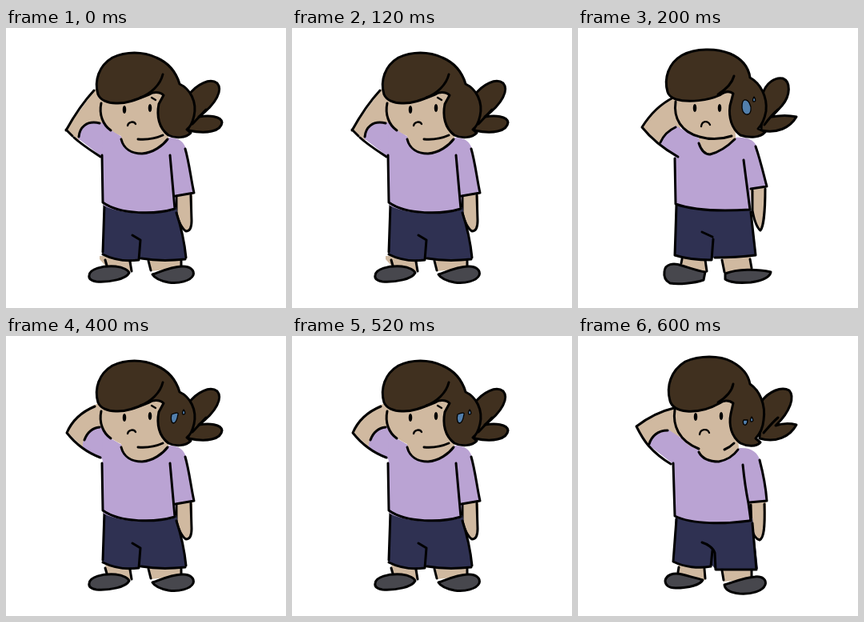
An HTML page that plays this animation: 350 px wide and 350 px high, repeating every 0.8 s.

```html
<!DOCTYPE html>
<html lang="en">
<head>
<meta charset="utf-8">
<title>Puzzled girl</title>
<style>
  html, body { margin: 0; width: 100%; height: 100%; overflow: hidden; background: #fff; }
  svg { display: block; width: 100vw; height: 100vh; }
  path { fill: none; stroke: none; stroke-width: 3; stroke-linecap: round; stroke-linejoin: round; }
  .skin { fill: #d0b9a0; }
  .shirt { fill: #baa3d3; }
  .shorts { fill: #2f3152; }
  .shoe { fill: #47474d; stroke: #000; }
  .hair { fill: #40301f; stroke: #000; }
  .line { stroke: #000; }
  .thin { stroke: #000; stroke-width: 2.3; }
  .eye { fill: #000; }
  .drop { fill: #527fac; stroke: #000; stroke-width: 1.3; }
  .pose { visibility: hidden; animation: show .8s step-end infinite; }
  .p2 { animation-delay: -.6s; }
  .p3 { animation-delay: -.4s; }
  .p4 { animation-delay: -.2s; }
  .twice { animation: blink .4s step-end infinite; }
  @keyframes show { 0% { visibility: visible; } 25%, 100% { visibility: hidden; } }
  @keyframes blink { 0% { visibility: visible; } 50%, 100% { visibility: hidden; } }
</style>
</head>
<body>
<svg viewBox="0 0 350 350">

  <!-- raised arm, high elbow -->
  <g class="pose p1">
    <path class="skin" d="M112 76L75 127L90 140L125 135L125 88ZM117 285L117 289L126 299L130 285Z"/>
    <path class="shirt" d="M90 138C92 125 100 116 119 118L146 137L146 172L120 161Z"/>
    <path class="line" d="M110 78C97 92 85 110 75 128M75 127L83 135M91 136C92 125 100 115 117 119M85 137C95 146 106 153 118 161"/>
  </g>

  <!-- raised arm, bent lower -->
  <g class="pose p3">
    <path class="skin" d="M116 84C95 92 82 106 76 120L96 139L126 135L125 88Z"/>
    <path class="shirt" d="M96 134C99 122 106 115 118 113L124 124L146 137L146 172L120 154L96 140Z"/>
    <path class="line" d="M111 88C94 95 82 107 76 121C87 135 102 146 118 152M98 130C101 122 107 115 117 114"/>
  </g>

  <!-- leaning pose -->
  <g class="pose twice">
    <path class="skin" d="M124 285L126 300L157 304L157 285ZM178 285L181 304L219 300L219 285ZM211 207L213 232C217 244 222 251 226 254C231 253 234 244 233 205Z"/>
    <path class="line" d="M124 290L126 297M155 292L157 304M178 291L181 303M219 291L219 297M213 211L213 232C215 241 220 251 225 254C230 254 232 249 232 241L231 209"/>
    <path class="shoe" d="M104 309C105 301 120 297 137 298C147 299 153 303 154 306C150 314 130 318 113 317C106 316 103 313 104 309Z"/>
    <path class="shoe" d="M183 308C193 305 204 299 219 298C230 297 236 303 234 309C231 316 216 320 203 318C193 316 186 313 183 308Z"/>
    <path class="shorts" d="M122 218L121 283C135 290 151 292 167 290L168 287C185 291 208 291 226 288L213 224Z"/>
    <path class="line" d="M123 221L121 280M121 283C135 290 151 292 166 290L168 265L158 259M169 288C186 291 206 291 224 289M213 231C218 246 223 267 225 287"/>
    <path class="shirt" d="M120 122L144 136L204 137C216 137 222 142 225 151C229 170 232 189 235 206L212 210L212 227C192 233 148 235 122 222Z"/>
    <path class="line" d="M120 159L121 218C143 234 188 233 211 226L205 159M224 151C229 168 231 188 235 206L212 210"/>
    <path class="skin" d="M119 88C116 111 122 125 144 135C146 150 156 157 170 157C185 156 197 147 203 138L198 75L130 75Z"/>
    <path class="line" d="M119 94C116 108 121 121 131 128M144 139C147 151 157 157 170 157C184 156 196 147 202 139M165 139C176 140 187 138 196 134"/>
    <path class="hair" d="M228 84C239 70 255 62 264 69C271 77 264 94 241 111C254 109 269 110 270 118C269 129 251 133 228 128Z"/>
    <path class="line" d="M233 120C238 115 245 107 250 102"/>
    <path class="hair" d="M115 83C110 66 116 47 133 37C150 29 171 29 188 37C202 43 212 53 217 70C230 76 239 92 235 110C233 119 230 124 226 127C228 129 230 130 231 131C225 138 211 138 203 134C191 125 188 110 191 95L197 84C192 79 183 80 179 83C162 90 149 95 137 94C127 94 118 90 115 83Z"/>
    <path class="line" d="M196 58C193 71 181 82 168 87"/>
    <path class="thin" d="M182 87L187 90"/>
    <path class="eye" d="M148 97C151 97 151 107 148 107C145 107 145 97 148 97ZM180 95C183 95 183 105 180 105C177 105 177 95 180 95Z"/>
    <path class="thin" d="M152 122C153 117 160 116 162 120"/>
  </g>
  <g class="pose p3">
    <path class="drop" d="M207 98C212 96 216 95 215 98C214 104 212 109 209 109C206 108 206 102 207 98ZM222 92C225 96 224 98 222 98C220 98 220 95 222 92Z"/>
  </g>

  <!-- upright pose, large drop -->
  <g class="pose p2">
    <path class="skin" d="M129 284L129 297L161 306L160 284ZM180 284L183 306L217 303L216 284ZM215 199L218 228C221 241 224 250 228 254C232 250 234 230 235 197ZM120 86C101 95 88 109 80 124L101 143L128 138L128 86Z"/>
    <path class="line" d="M130 289L129 294M159 290L161 304M180 290L183 305M215 289L217 300M218 203L218 228C220 239 223 249 228 253C232 249 234 225 234 201"/>
    <path class="shoe" d="M108 304C109 295 119 293 130 297C140 300 151 304 159 305L157 315C145 319 126 321 115 319C109 316 107 311 108 304Z"/>
    <path class="shoe" d="M184 307C199 301 224 301 241 305C240 312 229 316 216 318C203 319 189 318 184 314Z"/>
    <path class="shorts" d="M122 217L121 285C135 289 151 290 167 290L169 287C187 287 206 286 223 284L216 225Z"/>
    <path class="line" d="M123 222L121 284C136 289 151 290 167 290L169 264M155 255L168 261M171 287C188 287 206 286 222 284L216 230"/>
    <path class="shirt" d="M122 122L151 138L197 137C212 136 221 140 224 150C229 168 233 184 236 198L215 201L216 227C184 230 147 229 122 220L121 161L102 145C106 135 112 129 122 122Z"/>
    <path class="line" d="M119 87C103 95 90 108 80 124C92 139 109 152 125 161M103 143C107 134 113 128 122 124M121 163L122 220C147 229 184 229 215 227L207 165M222 148C228 165 232 183 236 198L216 201"/>
    <path class="skin" d="M122 87C118 109 127 130 151 136C153 151 159 158 165 158C177 156 189 147 197 138L196 75L130 75Z"/>
    <path class="line" d="M122 92C119 113 129 130 152 136C166 140 180 139 192 135M151 144C154 153 159 158 165 158C177 155 188 147 196 139"/>
    <path class="hair" d="M231 82C235 69 246 61 256 63C266 67 266 84 255 97L242 111C253 109 264 109 273 111C265 125 249 132 229 128Z"/>
    <path class="line" d="M233 121C238 114 244 107 250 102"/>
    <path class="hair" d="M112 80C107 63 113 44 130 34C147 25 173 25 190 32C204 38 213 48 215 62C228 69 237 86 235 104C233 115 229 122 225 126L234 130C228 137 215 138 203 134C192 126 188 112 190 97L194 82C188 77 181 81 177 84C164 90 139 94 122 89C117 87 113 84 112 80Z"/>
    <path class="line" d="M195 60C192 71 183 78 175 83"/>
    <path class="eye" d="M146 95C149 95 149 105 146 105C143 105 143 95 146 95ZM177 95C180 95 180 105 177 105C174 105 174 95 177 95Z"/>
    <path class="thin" d="M154 123C155 116 162 115 165 121"/>
    <path class="drop" d="M208 90C213 89 217 97 216 103C215 109 209 110 206 104C204 99 205 91 208 90ZM220 86C223 90 222 92 220 92C218 92 218 89 220 86Z"/>
  </g>

  <!-- elbow out, drops nearly gone -->
  <g class="pose p4">
    <path class="skin" d="M126 284L125 299L159 305L159 284ZM180 286L182 307L217 304L216 286ZM212 207L216 240C219 250 223 255 227 255C233 253 235 241 235 205ZM120 89C102 94 86 102 73 113C77 121 82 130 89 138L127 140L127 88Z"/>
    <path class="line" d="M126 289L125 295M158 291L159 303M180 293L182 305M217 293L217 300M216 211L217 240C219 249 223 254 227 255C232 253 234 241 233 210"/>
    <path class="shoe" d="M109 306C110 299 119 295 130 298C141 301 150 303 156 305C153 311 139 315 122 315C113 315 109 311 109 306Z"/>
    <path class="shoe" d="M183 311C194 308 207 302 221 301C231 300 236 305 234 311C231 319 217 323 202 322C191 321 184 318 183 311Z"/>
    <path class="shorts" d="M122 222L119 283C133 289 152 291 168 287L172 292L225 291L218 228Z"/>
    <path class="line" d="M123 229L119 282C133 289 151 291 166 288L168 268M155 258C162 260 169 265 171 271L172 292L223 292L218 234"/>
    <path class="shirt" d="M88 136C92 125 100 117 113 117L151 142L204 140C218 140 225 146 228 157C232 175 235 194 236 206L213 208L215 231C185 236 143 235 121 225L119 160Z"/>
    <path class="line" d="M120 90C103 94 86 103 73 113C77 121 82 130 88 137C96 146 106 154 116 160M89 135C92 125 100 118 112 118M119 159L121 225C143 236 184 235 214 231M206 161C208 181 211 199 213 209L216 231M227 155C232 174 235 192 236 206L214 208"/>
    <path class="skin" d="M121 87C117 114 127 135 151 142C153 151 163 157 176 157C187 155 195 148 201 140L196 75L130 75Z"/>
    <path class="line" d="M121 92C118 112 126 131 151 141M151 145C155 153 164 157 176 157C186 155 195 149 200 142M183 142C188 140 192 137 195 134"/>
    <path class="hair" d="M229 82C238 70 254 62 264 68C271 76 266 94 247 112C256 109 265 109 273 111C265 126 247 134 227 128Z"/>
    <path class="line" d="M232 121C238 114 244 107 250 102"/>
    <path class="hair" d="M115 81C110 63 116 43 134 32C152 24 177 24 192 32C205 39 213 48 215 60C227 68 235 86 232 105C231 116 226 124 222 128L228 133C223 139 211 138 203 134C192 126 188 112 191 97L194 84C188 79 181 81 177 84C163 92 149 95 136 94C124 93 117 88 115 81Z"/>
    <path class="line" d="M194 60C192 71 183 78 175 83"/>
    <path class="eye" d="M147 96C150 96 150 106 147 106C144 106 144 96 147 96ZM179 95C182 95 182 105 179 105C176 105 176 95 179 95Z"/>
    <path class="thin" d="M152 123C153 116 162 115 164 121"/>
    <path class="drop" d="M207 105L212 105C212 109 210 112 208 111C206 110 206 107 207 105ZM217 101C220 105 219 107 217 107C215 107 215 104 217 101Z"/>
  </g>
</svg>
</body>
</html>
```
